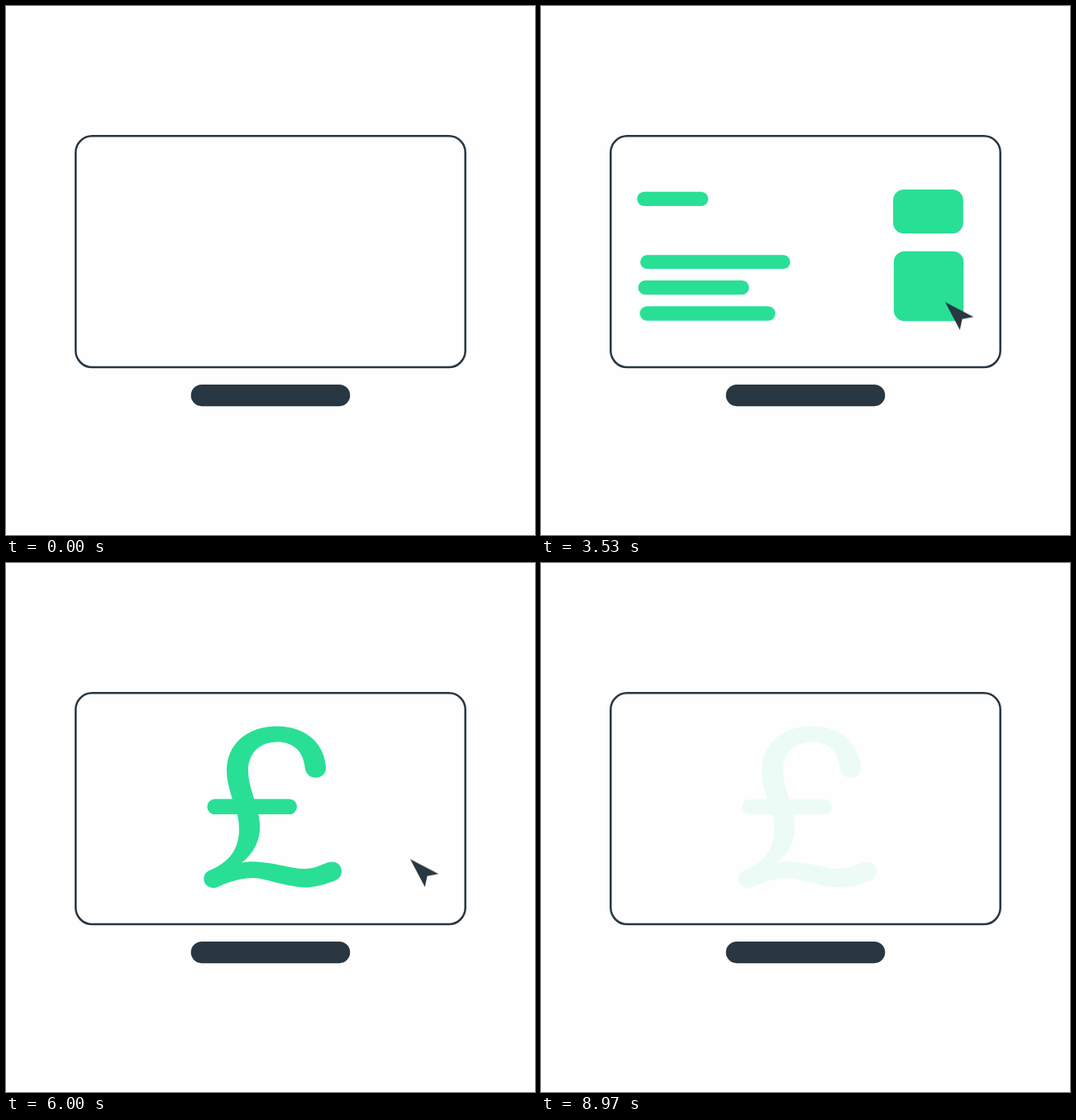
An HTML page that plays this animation: 640 px wide and 640 px high, repeating every 9610 ms.

```html
<!DOCTYPE html>
<html lang="en">
<head>
<meta charset="utf-8">
<title>Online payment</title>
<style>
  :root { --loop: 9610ms; --ink: #283741; --green: #29df95; }
  html, body { margin: 0; width: 100%; height: 100%; overflow: hidden; background: #fefefe; }
  svg { display: block; width: 100%; height: 100%; }

  .frame { fill: none; stroke: var(--ink); stroke-width: 2.5; }
  .stand { fill: var(--ink); }
  .card, .pound { fill: var(--green); }

  .leave, .card, .cursor, .pound {
    animation-duration: var(--loop);
    animation-timing-function: linear;
    animation-iteration-count: infinite;
  }

  /* Cards arrive one after another, sway, then leave together */
  .leave { animation-name: leave; }
  .full { animation-name: in-full, sway; }
  .first { animation-name: in-first, sway; }
  .last { animation-name: in-last, sway; }
  .early { animation-name: in-early; }
  .late { animation-name: in-late; }

  @keyframes in-full {
    0%, .42% { opacity: 0; transform: var(--from); }
    12.49%, 100% { opacity: 1; transform: none; }
  }
  @keyframes in-first {
    0%, .42% { opacity: 0; }
    6.45%, 100% { opacity: 1; }
  }
  @keyframes in-last {
    0%, 6.5% { opacity: 0; transform: var(--from); }
    12.49%, 100% { opacity: 1; transform: none; }
  }
  @keyframes in-early {
    0%, .42% { opacity: 0; transform: var(--from); }
    8.48%, 100% { opacity: 1; transform: none; }
  }
  @keyframes in-late {
    0%, 4.44% { opacity: 0; transform: var(--from); }
    12.45%, 100% { opacity: 1; transform: none; }
  }
  @keyframes sway {
    0%, 24.94% { translate: 0px; }
    31.22% { translate: var(--sway); }
    37.46% { translate: 0px; }
    43.7% { translate: calc(-1 * var(--sway)); }
    49.95%, 100% { translate: 0px; }
  }
  @keyframes leave {
    0%, 50% { opacity: 1; transform: none; }
    55.46%, 100% { opacity: 0; transform: var(--to); }
  }

  .cursor {
    fill: var(--ink);
    offset-path: path("M370.5 360.8 C421 320 440 465 489 358.2");
    offset-rotate: 0deg;
    animation-name: cursor-fade, cursor-move;
  }
  @keyframes cursor-fade {
    0%, .42% { opacity: 0; }
    12.49%, 88.35% { opacity: 1; }
    92.92%, 100% { opacity: 0; }
  }
  @keyframes cursor-move {
    0%, 24.97% { offset-distance: 0%; animation-timing-function: cubic-bezier(.4, .25, .6, .75); }
    35.38%, 100% { offset-distance: 100%; }
  }

  .pound {
    transform-origin: 372.6px 204.5px;
    animation-name: pound-show, pulse;
  }
  @keyframes pound-show {
    0%, 55.46% { opacity: 0; transform: translate(54px, 0); }
    62.4%, 88.35% { opacity: 1; transform: none; }
    93.34%, 100% { opacity: .08; transform: none; }
  }
  @keyframes pulse {
    0%, 75.08% { scale: 1; }
    80.23% { scale: 1.052; }
    85.38%, 100% { scale: 1; }
  }
</style>
</head>
<body>
<svg viewBox="0 0 640 640">
  <rect class="frame" x="84.3" y="157.3" width="471.4" height="279.8" rx="20"/>
  <rect class="stand" x="223.7" y="458" width="192.6" height="26.2" rx="13.1"/>

  <g class="leave" style="--to: translate(0, -38px)">
    <rect class="card full" style="--from: translate(0, -38px); --sway: -9.3px" x="117.3" y="224.7" width="86.1" height="17.3" rx="8.65"/>
  </g>
  <g class="leave" style="--to: none">
    <rect class="card first" style="--sway: 18px" x="118" y="301.2" width="181.4" height="16.9" rx="8.45"/>
  </g>
  <g class="leave" style="--to: translate(0, 21px)">
    <rect class="card full" style="--from: translate(0, 27px); --sway: -9.3px" x="118.6" y="332" width="134.2" height="17.3" rx="8.65"/>
  </g>
  <g class="leave" style="--to: translate(0, 21px)">
    <rect class="card last" style="--from: translate(0, 28px); --sway: 13px" x="118" y="363.3" width="164.1" height="17.4" rx="8.7"/>
  </g>
  <g class="leave" style="--to: translate(50px, 0)">
    <rect class="card late" style="--from: translate(52px, 0)" x="426" y="222" width="84.8" height="53.3" rx="13"/>
  </g>
  <g class="leave" style="--to: translate(50px, 0)">
    <rect class="card early" style="--from: translate(54px, 0)" x="426.8" y="296.7" width="84.5" height="84.5" rx="13"/>
  </g>

  <g class="pound">
    <path d="M387 247 C385 217 361 197.6 328 197.6 C291 197.6 267 220 267 251 C267 262 270 273 274 286
      L279.5 303 C281.5 311 282 316 282 322 C282 343 273 361 247 371.5 C241 374 239.3 378 239.3 382
      C239.3 389 245 393 251 393 C253 393 255 392.4 257 391.4 C272 385 286 381 299 381
      C313 381 340 392.4 363 392.4 C376 392.4 388 388 398 384.3 C403 382.4 406 378 406 373
      C406 366 401 361.5 394.5 361.5 C391 361.5 389 362.4 386 363.6 C377 367.4 370 370 361 370
      C345 370 322 361.2 298 361.2 C293 361.2 289 361.7 285 362.7 C300 351 307.2 336 307.2 319
      C307.2 313 306.2 308 305 303 L300.3 286 C296 271 293 262 293 251 C293 231 306 216.5 328 216.5
      C347 216.5 359.5 227 361.6 247 C362.4 255.5 368 259.7 375 259.7 C382 259.7 387.6 254 387 247 Z"/>
    <rect x="243.4" y="285.5" width="108.6" height="18.6" rx="9.3"/>
  </g>

  <path class="cursor" d="M0 0 L34.4 17.9 L20.6 20.6 L17.8 33.8 Z"/>
</svg>
</body>
</html>
```
